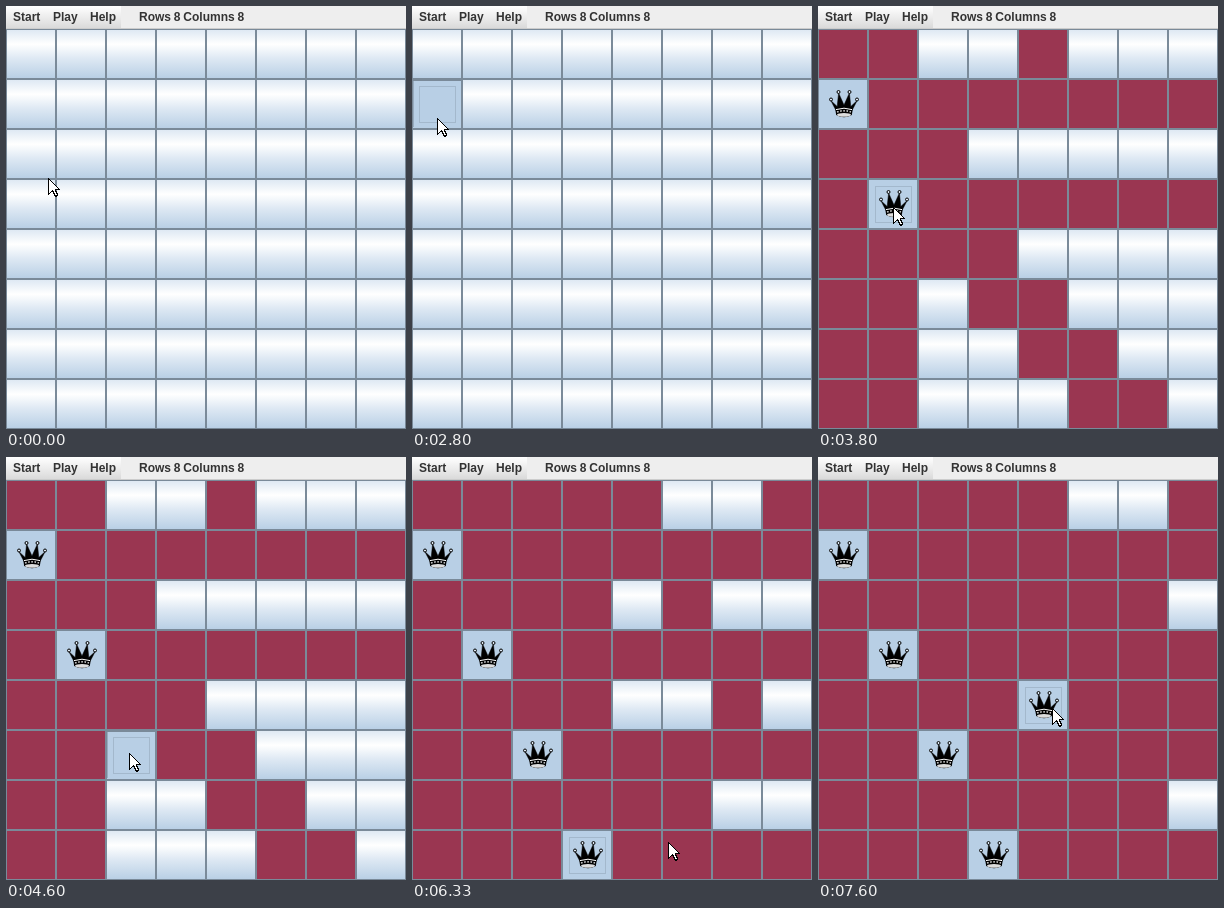
An HTML page for the animation above (8 s loop, 400 by 423 pixels).

```html
<!DOCTYPE html>
<html lang="en">
<head>
<meta charset="utf-8">
<title>Eight queens</title>
<style>
  html, body { margin: 0; width: 100%; height: 100%; overflow: hidden; background: #eee; }
  svg { display: block; }
  text { font: bold 12px "Liberation Sans", Arial, sans-serif; fill: #333; word-spacing: -.5px; }
</style>
</head>
<body>
<svg width="400" height="423" viewBox="0 0 400 423">
  <defs>
    <linearGradient id="button" x2="0" y2="1">
      <stop offset="0" stop-color="#dde8f3"/>
      <stop offset=".3" stop-color="#fff"/>
      <stop offset=".6" stop-color="#dde8f3"/>
      <stop offset="1" stop-color="#b8cfe5"/>
    </linearGradient>
    <linearGradient id="bar" x2="0" y2="1">
      <stop offset="0" stop-color="#fff"/>
      <stop offset="1" stop-color="#dadada"/>
    </linearGradient>
    <g id="ball"><circle r="1.5" fill="#dde8f3" stroke="#000"/></g>
    <g id="queen">
      <path d="M12.8 21.5L18 31.5H34L39.2 21.5L32.8 27.5L31.4 14L26 26L20.6 14L19.2 27.5Z" stroke="#000" stroke-width=".5"/>
      <use href="#ball" x="13" y="20.5"/>
      <use href="#ball" x="20.5" y="13"/>
      <use href="#ball" x="31.5" y="13"/>
      <use href="#ball" x="39" y="20.5"/>
      <path d="M17.3 30.5Q26 27.5 34.7 30.5L33.8 36Q26 40.5 18.2 36Z"/>
      <g fill="none" stroke="#fff">
        <path d="M18 30.6Q26 27.8 34 30.6"/>
        <path d="M19 33Q26 30.6 33 33" stroke-width="1.3" stroke-dasharray="1.6 1.6"/>
      </g>
      <ellipse cx="26" cy="35.8" rx="7" ry="1.9" fill="#ddd"/>
    </g>
  </defs>
  <rect width="400" height="423" fill="#eee"/>
  <rect width="115" height="22" fill="url(#bar)"/>
  <rect y="22" width="400" height="1" fill="#ccc"/>
  <text x="7" y="15">Start</text>
  <text x="47" y="15">Play</text>
  <text x="84" y="15">Help</text>
  <text x="133" y="15">Rows 8 Columns 8</text>
  <g id="board" stroke="#7a8a99"></g>
  <g id="pieces"></g>
  <path id="press" d="M1 48V1.5H49" fill="none" stroke="#7a8a99"/>
  <rect id="focus" x="7.5" y="7.5" width="36" height="36" fill="none" stroke="#a3b8cc"/>
  <path id="cursor" d="M.5 .5V16.5L4.5 12.5L7.5 18.5H8.5L9.5 16.5L7.5 12.5V11.5H11.5Z"
    fill="#fff" stroke="#000" shape-rendering="crispEdges"/>
</svg>
<script>
// All times are in ticks of 1/15 second.
const TICK = 1000 / 15, LOOP = 120;
const SIZE = 8, CELL = 50, TOP = 23;
const RED = '#9a3651', BLUE = '#b8cfe5', BUTTON = 'url(#button)';

// One queen per column, from the left.
const moves = [
  { row: 1, down: 42, up: 44 },
  { row: 3, down: 56, up: 57 },
  { row: 5, down: 69, up: 71 },
  { row: 7, down: 85, up: 87 },
  { row: 4, down: 113, up: 114 }
].map((move, col) => ({ ...move, col }));

// Cursor glides: from tick, to tick, x, y.
const home = [42, 172];
const glides = [
  [6, 7, 42, 171], [27, 28, 30, 89], [28, 32, 25, 112],
  [49, 53, 75, 199], [56, 57, 75, 201],
  [60, 64, 123, 296], [70, 71, 123, 298],
  [75, 81, 170, 397], [86, 87, 170, 400],
  [89, 95, 256, 385], [95, 98, 281, 345], [98, 100, 250, 224],
  [100, 102, 236, 239], [102, 105, 234, 251]
];

const $ = id => document.getElementById(id);

function add(parent, tag, attrs) {
  const el = document.createElementNS('http://www.w3.org/2000/svg', tag);
  for (const key in attrs) el.setAttribute(key, attrs[key]);
  return parent.appendChild(el);
}

function place(el, x, y) {
  el.setAttribute('transform', `translate(${x} ${y})`);
}

function placeInCell(el, { row, col }) {
  place(el, col * CELL, TOP + row * CELL);
}

function show(el, on) {
  el.style.display = on ? '' : 'none';
}

const cells = Array.from({ length: SIZE * SIZE }, (_, i) => {
  const cell = { row: Math.floor(i / SIZE), col: i % SIZE };
  cell.el = add($('board'), 'rect', { x: 0.5, y: 0.5, width: CELL - 1, height: CELL - 1 });
  placeInCell(cell.el, cell);
  return cell;
});

const queens = moves.map(move => {
  const el = add($('pieces'), 'use', { href: '#queen' });
  placeInCell(el, move);
  return el;
});

const same = (a, b) => a.row === b.row && a.col === b.col;
const attacks = (a, b) =>
  a.row === b.row || a.col === b.col || Math.abs(a.row - b.row) === Math.abs(a.col - b.col);

const ease = u => u * u * (3 - 2 * u);

function cursorAt(tick) {
  let [x, y] = home;
  for (const [from, to, toX, toY] of glides) {
    if (tick <= from) break;
    const k = ease(Math.min(1, (tick - from) / (to - from)));
    x += (toX - x) * k;
    y += (toY - y) * k;
  }
  return [Math.round(x), Math.round(y)];
}

function draw(tick) {
  const placed = moves.filter(m => tick >= m.up);
  const active = moves.filter(m => tick >= m.down).pop();

  for (const cell of cells) {
    const blue = placed.some(m => same(m, cell)) || (active && same(active, cell));
    const red = placed.some(m => attacks(m, cell));
    cell.el.setAttribute('fill', blue ? BLUE : red ? RED : BUTTON);
  }
  queens.forEach((el, i) => show(el, i < placed.length));

  show($('focus'), active);
  show($('press'), active && tick < active.up);
  if (active) [$('focus'), $('press')].forEach(el => placeInCell(el, active));

  place($('cursor'), ...cursorAt(tick));
}

const start = performance.now();
function run() {
  // The small lead absorbs rounding of tick times.
  const elapsed = performance.now() - start + 5;
  draw(Math.floor(elapsed / TICK) % LOOP);
  requestAnimationFrame(run);
}
run();
</script>
</body>
</html>
```
